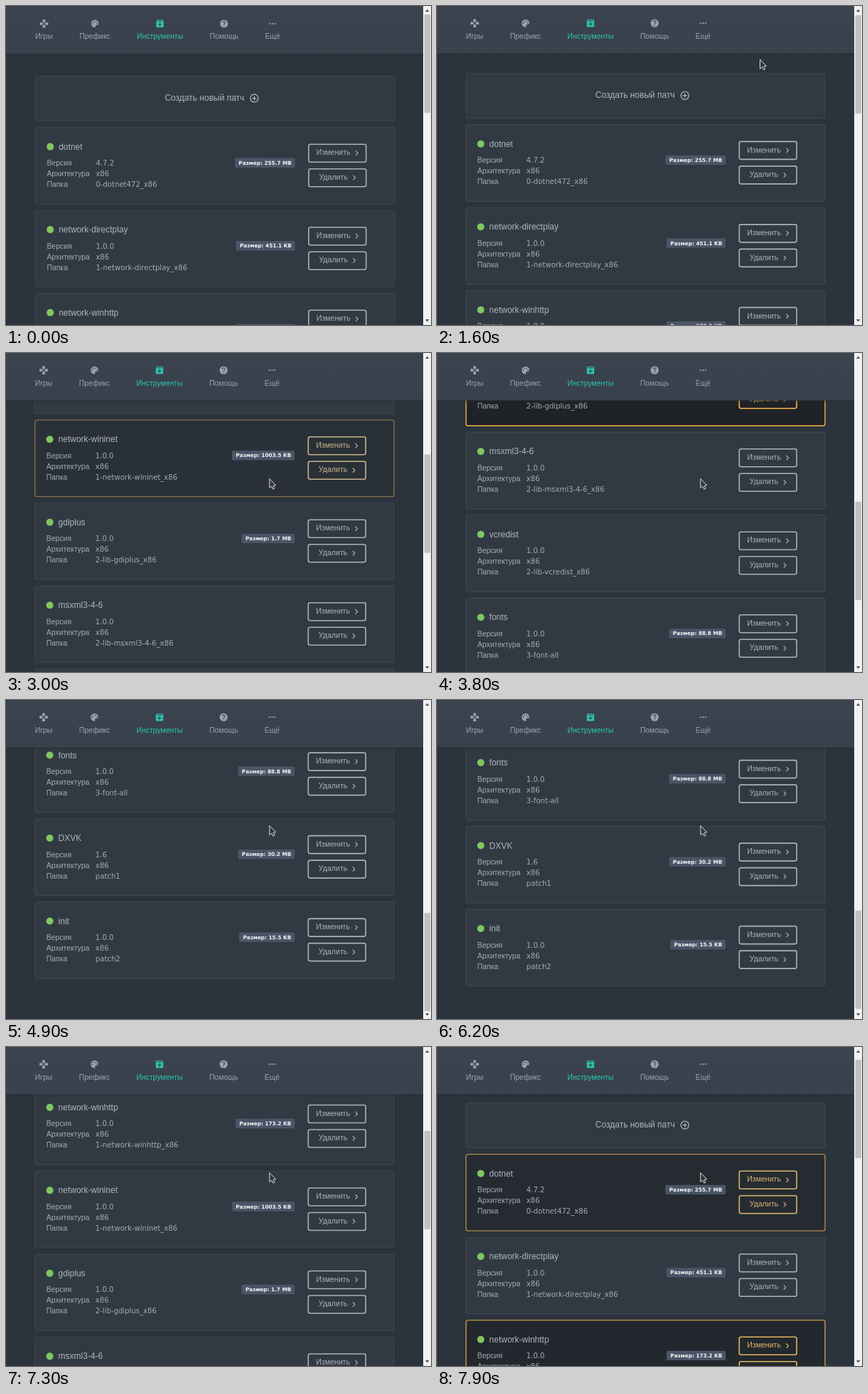
These frames come from a looping animation (598 by 448 pixels, 8 s). An HTML page:

```html
<!DOCTYPE html>
<html lang="ru">
<head>
<meta charset="utf-8">
<style>
  html, body { margin: 0; width: 100%; height: 100%; overflow: hidden; background: #2b333c; }
  svg { display: block; width: 598px; height: 448px; font-family: "Liberation Sans", Arial, sans-serif; }
  .title { font-size: 12px; fill: #aeb5bb; }
  .label { font-size: 10.45px; fill: #a3abb2; }
  .value { font: 10.1px "DejaVu Sans", sans-serif; fill: #a3abb2; }
  .badge { font: bold 7.3px "DejaVu Sans", sans-serif; fill: #f4f6f8; text-anchor: end; }
  .button { font-size: 10.6px; }
  .tab { font-size: 10.45px; text-anchor: middle; }
</style>
</head>
<body>
<svg id="stage" viewBox="0 0 598 448">
  <defs>
    <linearGradient id="bar" x2="0" y2="1">
      <stop stop-color="#3b434f"/><stop offset="1" stop-color="#38414c"/>
    </linearGradient>
    <linearGradient id="shade" x2="0" y2="1">
      <stop stop-color="#1f262d" stop-opacity=".45"/><stop offset="1" stop-color="#1f262d" stop-opacity="0"/>
    </linearGradient>
  </defs>
  <rect width="598" height="448" fill="#2b333c"/>
  <g id="page">
    <g id="list"></g>
    <rect y="66" width="587" height="5" fill="url(#shade)"/>
    <rect x="-1" y="-1" width="589" height="67.5" fill="url(#bar)"/>
    <g id="tabs"></g>
  </g>
  <rect x="587" width="11" height="448" fill="#f1f1f1"/>
  <path d="M590 8 l2.7 -3.4 2.7 3.4z M590 440 l2.7 3.4 2.7 -3.4z" fill="#555"/>
  <rect id="thumb" x="588.5" width="8.5" height="138" fill="#c1c1c1"/>
  <path id="cursor" d="M0 0 V13 L3 10.7 L5 14.7 L7.2 13.6 L5.4 9.8 L8.8 9.2 Z" fill="#34363b" stroke="#dcdcdc" stroke-linejoin="round"/>
</svg>
<script>
const LOOP = 8000, FADE = 300, PITCH = 116.5, FIRST_TOP = 169.5;
const $ = id => document.getElementById(id);

function add(parent, tag, attrs, text) {
  const node = document.createElementNS("http://www.w3.org/2000/svg", tag);
  for (const key in attrs) node.setAttribute(key, attrs[key]);
  if (text) node.textContent = text;
  parent.append(node);
  return node;
}

// name, version, folder, size, hover intervals
const patches = [
  ["dotnet", "4.7.2", "0-dotnet472_x86", "255.7 MB", [[7715, 8400]]],
  ["network-directplay", "1.0.0", "1-network-directplay_x86", "451.1 KB"],
  ["network-winhttp", "1.0.0", "1-network-winhttp_x86", "173.2 KB", [[7450, 7830]]],
  ["network-wininet", "1.0.0", "1-network-wininet_x86", "1003.5 KB", [[2880, 3220]]],
  ["gdiplus", "1.0.0", "2-lib-gdiplus_x86", "1.7 MB", [[3280, 3820]]],
  ["msxml3-4-6", "1.0.0", "2-lib-msxml3-4-6_x86", ""],
  ["vcredist", "1.0.0", "2-lib-vcredist_x86", "", [[6480, 6850]]],
  ["fonts", "1.0.0", "3-font-all", "88.8 MB"],
  ["DXVK", "1.6", "patch1", "30.2 MB"],
  ["init", "1.0.0", "patch2", "15.5 KB"]
];

function addButton(card, y, text) {
  const g = add(card, "g", { transform: `translate(0 ${y})` });
  const frame = add(g, "rect", { x: 425.3, y: .8, width: 80.8, height: 25, rx: 2.5, fill: "none", "stroke-width": 1.6 });
  const label = add(g, "text", { y: 16, class: "button" }, text);
  const width = label.getComputedTextLength(), x = 465.6 - (width + 11) / 2;
  label.setAttribute("x", x);
  const arrow = add(g, "path", { d: `M${x + width + 7.5} 10 l3 3.2 -3 3.2`, fill: "none", "stroke-width": 1.2 });
  return color => {
    frame.setAttribute("stroke", color);
    label.setAttribute("fill", color);
    arrow.setAttribute("stroke", color);
  };
}

function addCard([name, version, folder, size, hovers = []], index) {
  const card = add($("list"), "g", { transform: `translate(0 ${FIRST_TOP + index * PITCH})` });
  const box = add(card, "rect", { x: 40.8, y: .5, width: 505.2, height: 107.5, rx: 3, "stroke-width": 1.4 });
  add(card, "circle", { cx: 61.6, cy: 27.5, r: 5, fill: "#7fc861" });
  add(card, "text", { x: 73.6, y: 31.5, class: "title" }, name);
  [["Версия", version], ["Архитектура", "x86"], ["Папка", folder]].forEach(([label, value], row) => {
    const y = 54 + row * 15;
    add(card, "text", { x: 56.8, y, class: "label" }, label);
    add(card, "text", { x: 125.8, y, class: "value" }, value);
  });
  if (size) {
    const back = add(card, "rect", { y: 43.5, height: 13.3, rx: 1.5, fill: "#4a5567" });
    const text = add(card, "text", { x: 401.3, y: 52.8, class: "badge" }, "Размер: " + size);
    const width = text.getComputedTextLength() + 10;
    back.setAttribute("x", 406 - width);
    back.setAttribute("width", width);
  }
  const buttons = [addButton(card, 23.3, "Изменить"), addButton(card, 57.8, "Удалить")];
  return t => {
    const k = Math.max(0, ...hovers.map(([from, to]) => clamp((t - from) / FADE) - clamp((t - to) / FADE)));
    box.setAttribute("fill", mix([49, 58, 67], [31, 34, 39], k));
    box.setAttribute("stroke", mix([59, 68, 77], [243, 181, 68], k));
    buttons.forEach(paint => paint(mix([170, 177, 183], [243, 181, 68], k)));
  };
}

function addCreateCard() {
  const card = add($("list"), "g", { transform: "translate(0 97.5)" });
  add(card, "rect", { x: 40.8, y: .5, width: 505.2, height: 63, rx: 3, fill: "#313a43", stroke: "#3b444d", "stroke-width": 1.2 });
  add(card, "text", { x: 222.8, y: 35.2, class: "title" }, "Создать новый патч");
  add(card, "path", { d: "M343.2 31.5 a5.6 5.6 0 1 0 11.2 0 a5.6 5.6 0 1 0 -11.2 0 M345.8 31.5 h6 M348.8 28.5 v6", fill: "none", stroke: "#aeb5bb", "stroke-width": 1.3 });
}

function addTabs() {
  const gray = "#9aa4ad", teal = "#2cc5b2", dark = "#39424e";
  const icon = (x, color) => add($("tabs"), "g", { transform: `translate(${x} 24.2)`, fill: color });
  const tab = (x, text, color = gray) => {
    add($("tabs"), "text", { x, y: 45.6, class: "tab", fill: color }, text);
    return icon(x, color);
  };
  const games = tab(53, "Игры");
  for (let a = 0; a < 360; a += 90)
    add(games, "path", { d: "M-1.9 -5.8 h3.8 v3 l-1.9 1.9 -1.9 -1.9z", transform: `rotate(${a})` });

  const palette = tab(124.5, "Префикс");
  add(palette, "path", { d: "M0 -5.3 C-7 -5.3 -7 5.3 0 5.3 C2 5.3 .2 3 1 2.2 C2 1.4 5.3 3 5.3 -.6 C5.3 -3.5 3 -5.3 0 -5.3z" });
  [[-3, 0], [-1.5, -2.7], [1.6, -2.7], [3.2, -.2]].forEach(([cx, cy]) => add(palette, "circle", { cx, cy, r: .85, fill: dark }));

  const tools = tab(216, "Инструменты", teal);
  add(tools, "path", { d: "M-4 -5.3 h8 l1.2 1.5 v7.8 q0 1.2 -1.2 1.2 h-8 q-1.2 0 -1.2 -1.2 v-7.8z" });
  add(tools, "path", { d: "M-3.8 -3.6 h7.6 M-2.6 1.2 h5.2 M0 -1.4 v5.2", stroke: dark, "stroke-width": 1.1 });

  const help = tab(306.2, "Помощь");
  add(help, "circle", { r: 5.6 });
  add(help, "path", { d: "M-1.8 -1.5 C-1.8 -4 1.9 -3.8 1.8 -1.5 C1.7 -.2 0 0 0 1.6 M0 2.6 v1.2", fill: "none", stroke: dark, "stroke-width": 1.1 });

  const more = tab(374.5, "Ещё");
  [-3.5, 0, 3.5].forEach(cx => add(more, "circle", { cx, r: 1.1 }));
}

const clamp = x => Math.min(1, Math.max(0, x));
const mix = (a, b, k) => `rgb(${a.map((v, i) => Math.round(v + (b[i] - v) * k))})`;

// Linear interpolation over [time, value] points
function track(points, t) {
  const i = points.findIndex(p => p[0] > t);
  if (i === 0) return points[0][1];
  if (i < 0) return points[points.length - 1][1];
  const [t0, v0] = points[i - 1], [t1, v1] = points[i];
  return v0 + (v1 - v0) * (t - t0) / (t1 - t0);
}

const scrollPoints = [[1520, 0], [1600, 3], [1750, 40], [3000, 425], [3600, 622], [3720, 622], [3800, 641],
  [4650, 910], [4850, 935], [6120, 935], [6200, 925], [6800, 617.5], [7900, 19.5], [8000, 3]];
const cursorX = [[500, 600], [1100, 454.5], [1650, 454.5], [2250, 370.8]];
const cursorY = [[500, 30], [1100, 75], [1650, 75], [2250, 176.5]];

addCreateCard();
const cards = patches.map(addCard);
addTabs();

function draw(t) {
  const scroll = track(scrollPoints, t);
  const settle = .6 * (1 - clamp(t / 900));
  $("page").setAttribute("transform", `translate(${settle} ${settle})`);
  $("list").setAttribute("transform", `translate(0 ${-scroll})`);
  $("thumb").setAttribute("y", 12 + scroll * .307);
  $("cursor").setAttribute("transform", `translate(${track(cursorX, t)} ${track(cursorY, t)})`);
  cards.forEach(update => update(t));
}

const start = performance.now();
function tick() {
  draw((performance.now() - start) % LOOP);
  requestAnimationFrame(tick);
}
tick();
</script>
</body>
</html>
```
